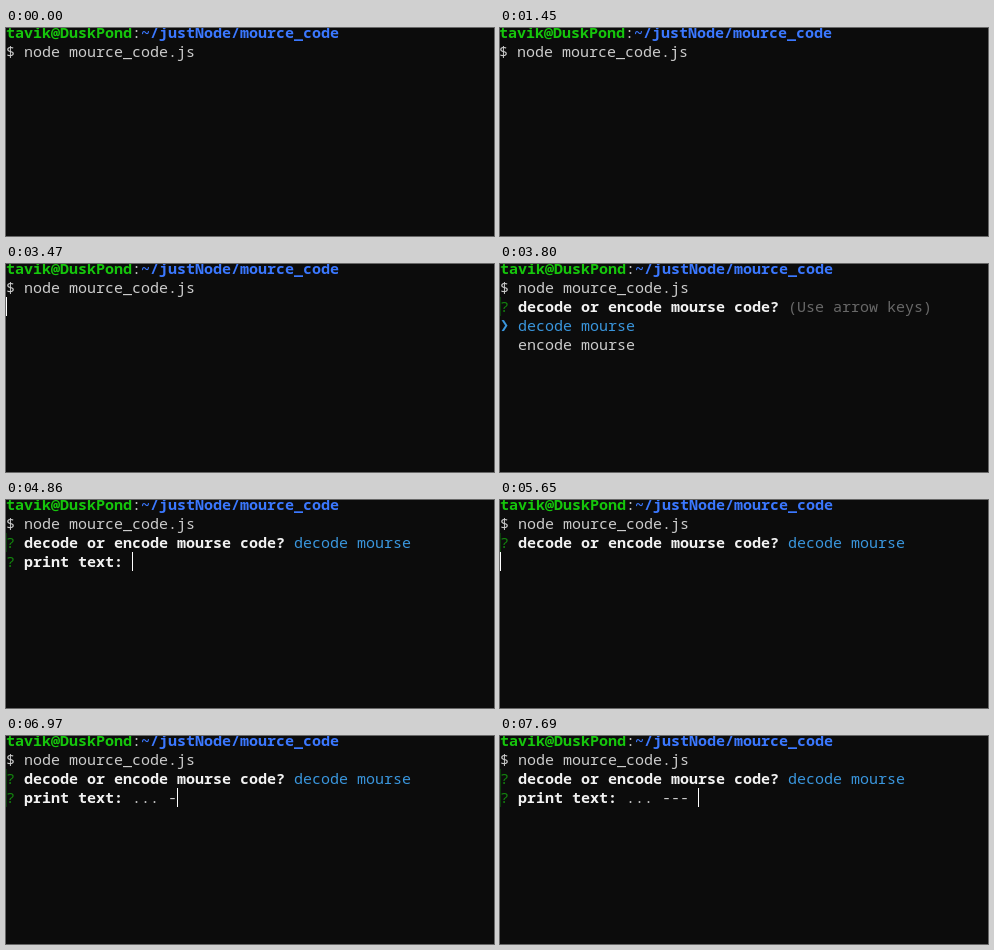
An HTML page that plays this animation: 488x208 px, repeating every 8000 ms.

```html
<!DOCTYPE html>
<html lang="en">
<head>
<meta charset="utf-8">
<style>
  html, body { margin: 0; width: 100%; height: 100%; overflow: hidden; background: #0c0c0c; }
  #screen {
    position: absolute; left: 0; top: -5px; width: 488px; height: 213px;
    font: 500 15px/19px "Noto Sans Mono", "DejaVu Sans Mono", monospace;
    font-variant-ligatures: none; color: #ccc; white-space: pre;
  }
  .row { position: relative; height: 19px; }
  b { font-weight: 600; color: #f2f2f2; }
  .user { color: #16c60c; }
  .path { color: #3b78ff; }
  .mark { color: #13850e; font-weight: 500; }
  .pick { color: #3a96dd; }
  .hint { color: #686868; }
  .arrow { position: absolute; left: 0; font-family: "DejaVu Sans Mono", monospace; }
  .edge::before { content: ""; position: absolute; left: 0; top: 0; width: 1px; height: 19px; background: #0b3d0b; }
  #cursor { position: absolute; width: 1px; height: 19px; background: #fff; }
</style>
</head>
<body>
<div id="screen"><div id="rows"></div><div id="cursor"></div></div>
<script>
const LOOP = 8000, CELL = 9, LINE = 19;
const screen = document.getElementById('screen');
const rows = document.getElementById('rows');
const cursor = document.getElementById('cursor');

const row = (html, cls = '') => `<div class="row ${cls}">${html}</div>`;
const span = (cls, text) => `<span class="${cls}">${text}</span>`;
const ask = text => `<b class="mark">?</b> <b>${text}</b> `;

const shell = row('<b class="user">tavik@DuskPond</b>:<b class="path">~/justNode/mource_code</b>')
  + row('$ node mource_code.js');
const question = answer => row(ask('decode or encode mourse code?') + answer, 'edge');
const menu = shell + question(span('hint', '(Use arrow keys)'))
  + row(span('pick', '<span class="arrow">❯</span>  decode mourse'))
  + row('  encode mourse');
const chosen = shell + question(span('pick', 'decode mourse'));

// Input prompt with the typed text; the cursor follows it.
const input = (text, cls = 'edge') => ({
  html: chosen + row(ask('print text:') + text, cls),
  at: [14 + text.length, 3]
});

const typed = [
  [5720, '.'], [5850, '..'], [5980, '...'], [6510, '... '],
  [6970, '... -'], [7100, '... --'], [7230, '... ---'], [7690, '... --- ']
];

const steps = [
  [0, { html: shell }],
  [1450, { html: shell, shift: -1 }],
  [1780, { html: shell }],
  [2520, { html: shell, at: [22, 1] }],
  [3470, { html: shell, at: [0, 2] }],
  [3800, { html: menu }],
  [4860, input('', '')],
  [5650, { html: chosen, at: [0, 3] }],
  ...typed.map(([time, text]) => [time, input(text)])
];

let shown;
function draw(now) {
  const t = now % LOOP;
  const state = steps.filter(([start]) => start <= t).pop()[1];
  if (state !== shown) {
    shown = state;
    const { html, at, shift = 0 } = state;
    rows.innerHTML = html;
    screen.style.left = shift + 'px';
    cursor.hidden = !at;
    if (at) {
      cursor.style.left = at[0] * CELL + 'px';
      cursor.style.top = at[1] * LINE + 'px';
    }
  }
  requestAnimationFrame(() => draw(performance.now()));
}
draw(performance.now());
</script>
</body>
</html>
```
